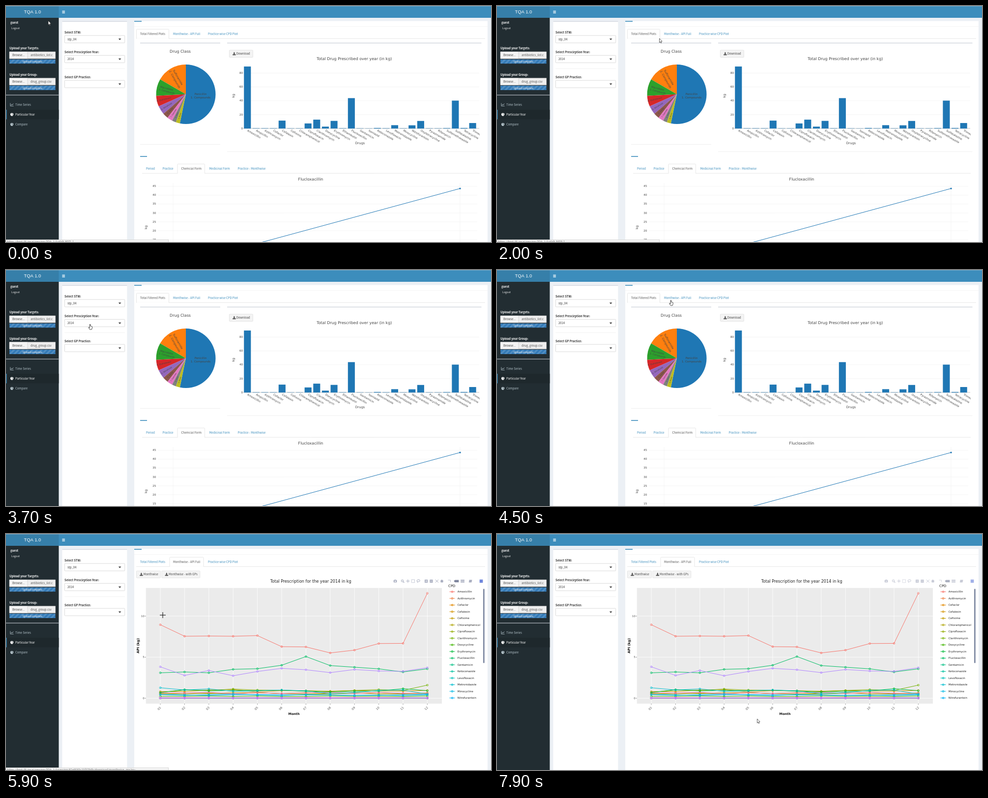
An HTML page with a canvas for the animation above (8000 ms loop, 987x480 px).

```html
<!DOCTYPE html>
<html lang="en">
<head>
<meta charset="utf-8">
<title>Prescription dashboard</title>
<style>
html, body { margin: 0; width: 100%; height: 100%; overflow: hidden; background: #ecf0f5; }
canvas { display: block; width: 987px; height: 480px; }
</style>
</head>
<body>
<canvas id="stage" width="987" height="480"></canvas>
<script>
const ctx = document.getElementById('stage').getContext('2d');
const LOOP = 8000, STEP = 100, SWITCH = 4800;
const UI = '"Noto Sans CJK JP", "Noto Sans CJK SC", "Open Sans", sans-serif';
const PLOT = '"DejaVu Sans", sans-serif';
const LINK = '#3c8dbc', BLUE = '#1f77b4', INK = '#444';

// ---------- helpers ----------
function rect(x, y, w, h, fill) { ctx.fillStyle = fill; ctx.fillRect(x, y, w, h); }

function frame(x, y, w, h, fill, stroke, r = 0) {
  ctx.beginPath();
  ctx.roundRect(x, y, w, h, r);
  if (fill) { ctx.fillStyle = fill; ctx.fill(); }
  if (stroke) { ctx.strokeStyle = stroke; ctx.lineWidth = 0.7; ctx.stroke(); }
}

function line(points, color, width = 1) {
  ctx.beginPath();
  points.forEach(([x, y], i) => i ? ctx.lineTo(x, y) : ctx.moveTo(x, y));
  ctx.strokeStyle = color;
  ctx.lineWidth = width;
  ctx.stroke();
}

function poly(points, fill, stroke, width = 0.8) {
  ctx.beginPath();
  points.forEach(([x, y], i) => i ? ctx.lineTo(x, y) : ctx.moveTo(x, y));
  ctx.closePath();
  if (fill) { ctx.fillStyle = fill; ctx.fill(); }
  if (stroke) { ctx.strokeStyle = stroke; ctx.lineWidth = width; ctx.stroke(); }
}

function disc(x, y, r, fill, stroke) {
  ctx.beginPath();
  ctx.arc(x, y, r, 0, Math.PI * 2);
  if (fill) { ctx.fillStyle = fill; ctx.fill(); }
  if (stroke) { ctx.strokeStyle = stroke; ctx.lineWidth = 0.95; ctx.stroke(); }
}

function text(str, x, y, { size = 5.88, color = INK, font = UI, weight = 400, align = 'left', base = 'alphabetic', turn = 0 } = {}) {
  ctx.save();
  ctx.translate(x, y);
  ctx.rotate(turn * Math.PI / 180);
  ctx.font = `${weight} ${size}px ${font}`;
  ctx.fillStyle = color;
  ctx.textAlign = align;
  ctx.textBaseline = base;
  ctx.fillText(str, 0, 0);
  ctx.restore();
}

const plotText = (str, x, y, opt) => text(str, x, y, { font: PLOT, size: 5.6, ...opt });

function clipped(x, y, w, h, draw) {
  ctx.save();
  ctx.beginPath();
  ctx.rect(x, y, w, h);
  ctx.clip();
  draw();
  ctx.restore();
}

function downloadIcon(x, y) {
  rect(x - 0.8, y - 3.2, 1.6, 2.6, INK);
  poly([[x - 2.2, y - 0.8], [x + 2.2, y - 0.8], [x, y + 1.5]], INK);
  rect(x - 3.2, y + 1.2, 6.4, 1.8, INK);
}

function button(x, y, w, h, label) {
  frame(x, y, w, h, '#f4f4f4', '#ddd', 1.2);
  downloadIcon(x + 10, y + h / 2);
  text(label, x + 14.3, y + h / 2 + 2.2);
}

function pieIcon(x, y, color, back) {
  disc(x, y, 3.1, color);
  line([[x + 0.3, y - 3.4], [x + 0.3, y], [x + 3, y + 2.2]], back, 0.7);
}

function tabs(items, active, y, x0, x1) {
  line([[x0, y], [x1, y]], '#ddd', 0.7);
  items.forEach(([label, x, left, right], i) => {
    if (i === active) {
      frame(left, y - 19, right - left, 19, '#fff', '#ddd', [1.5, 1.5, 0, 0]);
      rect(left + 0.4, y - 0.7, right - left - 0.8, 1.6, '#fff');
    }
    text(label, x, y - 7.2, { color: i === active ? '#555' : LINK });
  });
}

// Evenly spaced hues at chroma 100, luminance 65
function hue(i, n = 27) {
  const a = (15 + 360 * i / n) * Math.PI / 180, Y = 0.3405;
  const u = 100 * Math.cos(a) / 845 + 0.1978, v = 100 * Math.sin(a) / 845 + 0.4683;
  const X = 9 * Y * u / (4 * v), Z = Y * (12 - 3 * u - 20 * v) / (4 * v);
  const rgb = [
    3.2406 * X - 1.5372 * Y - 0.4986 * Z,
    -0.9689 * X + 1.8758 * Y + 0.0415 * Z,
    0.0557 * X - 0.204 * Y + 1.057 * Z
  ].map(c => {
    const g = c <= 0.0031 ? 12.92 * c : 1.055 * Math.pow(c, 1 / 2.4) - 0.055;
    return Math.round(255 * Math.min(1, Math.max(0, g)));
  });
  return `rgb(${rgb})`;
}

// ---------- data ----------
const DRUGS = ('Amoxicillin Ampicillin Azithromycin Cefaclor Cefalexin Cefixime Chloramphenicol Ciprofloxacin ' +
  'Clarithromycin Doxycycline Erythromycin Ethambutol Flucloxacillin Gentamicin Isoniazid Ketoconazole ' +
  'Levofloxacin Metronidazole Minocycline Nitrofurantoin Oxytetracycline Pyrazinamide Rifampicin ' +
  'Sulfamethoxazole Sulfasalazine Tetracycline Trimethoprim').split(' ');
const KG = [89.5, .3, .3, .3, 11.3, .2, .2, 7.2, 12.7, 2.6, 10.9, .3, 43.8, .2, .1, .7, .3, 4.7, .2, 4.5, 10.8, .2, .2, .5, 40.2, .7, 7.8];
const LEGEND = DRUGS.filter(d => !/Ampi|Etham|Isoni/.test(d)).slice(0, 17);

function wobble(seed, mean) {
  let s = seed * 7919 + 17;
  return Array.from({ length: 12 }, () => {
    s = (s * 16807) % 2147483647;
    return Math.max(0, mean * (0.82 + 0.36 * s / 2147483647));
  });
}

const SERIES = [
  [3, wobble(3, 0.92)], [4, wobble(4, 0.58)], [1, wobble(1, 0.02)], [5, wobble(5, 0.01)],
  [6, wobble(6, 0.6)], [8, wobble(8, 0.24)], [11, wobble(11, 0.02)], [12, wobble(12, 0.05)],
  [13, wobble(13, 0.02)], [16, wobble(16, 0.4)], [24, wobble(24, 0.06)], [25, wobble(25, 0.65)],
  [7, [.7, 1, .95, 1.12, 1, .95, .92, .82, .95, 1.06, .95, 1.6]],
  [9, [.7, 1.05, .9, .95, .92, 1, .85, .75, .85, .88, 1.17, .92]],
  [14, [1.28, 1, 1.14, .85, .9, 1, .9, .55, .7, .95, 1, .5]],
  [15, [.45, .35, .45, .52, .4, .32, .45, .4, .35, .4, .32, .42]],
  [22, wobble(22, 0.03)], [20, wobble(20, 0.01)],
  [10, [3.1, 3.2, 3.1, 3.52, 3.6, 4.02, 5.08, 3.98, 3.78, 3.58, 3.2, 3.58]],
  [19.6, [3.83, 2.78, 3.38, 2.74, 3.26, 3.64, 3.47, 3.12, 3.5, 3.32, 3.28, 3.72]],
  [0, [8.95, 7.55, 7.58, 7.55, 7.63, 6.28, 6.25, 5.52, 5.86, 6.66, 6.68, 12.78]]
];

// ---------- page shell ----------
function upload(y, title, file) {
  const white = { color: '#fff', weight: 700 };
  text(title, 7, y, white);
  frame(7, y + 4.7, 93.5, 14, '#eee', '#ccc');
  rect(7, y + 4.7, 37, 14, '#f4f4f4');
  line([[44, y + 4.7], [44, y + 18.7]], '#ccc', 0.7);
  text('Browse...', 13, y + 14);
  clipped(45, y + 4, 50, 15, () => text(file, 50, y + 14, { color: '#555' }));
  clipped(7, y + 20, 93.5, 9, () => {
    rect(7, y + 20, 94, 9, '#337ab7');
    for (let x = -4; x < 110; x += 9.35) {
      poly([[x, y + 29], [x + 4.7, y + 29], [x + 13.7, y + 20], [x + 9, y + 20]], 'rgba(255,255,255,.15)');
    }
    text('Upload complete', 53.8, y + 26.6, { color: '#fff', size: 5.04, align: 'center' });
  });
}

function select(y, label, value) {
  text(label, 119, y, { color: '#333', weight: 700 });
  frame(119.3, y + 4.4, 122.4, 15, '#fff', '#ccc', 1);
  text(value, 125, y + 14.2, { color: '#333' });
  poly([[228.8, y + 10.7], [234.4, y + 10.7], [231.6, y + 13.7]], '#333');
}

function shell() {
  rect(0, 0, 987, 480, '#ecf0f5');
  rect(0, 0, 987, 24, LINK);
  rect(0, 0, 107.4, 24, '#367fa9');
  rect(0, 0, 987, 0.6, '#a5c4d6');
  text('TQA 1.0', 53.8, 15.3, { font: '"Liberation Sans", Arial, sans-serif', size: 9.3, color: '#fff', align: 'center' });
  for (let i = 0; i < 3; i++) rect(114.3, 9.6 + i * 2.1, 5.6, 1.1, '#fff');

  rect(0, 24, 107.4, 456, '#222d32');
  text('guest', 9, 36.3, { color: '#fff', weight: 700 });
  text('Logout', 11, 46.8, { color: '#fff', size: 5.1 });
  upload(88.4, 'Upload your Targets:', 'antibiotics_list.csv');
  upload(142, 'Upload your Group:', 'drug_group.csv');
  rect(0, 180.6, 107.4, 1, '#d2d6de');
  rect(0, 211, 107.4, 19.5, '#1e282c');
  rect(0, 211, 1.4, 19.5, LINK);
  line([[8.8, 197.5], [8.8, 203.5], [15.5, 203.5]], '#b8c7ce', 0.8);
  line([[10, 202], [11.6, 200], [12.8, 201.2], [15, 198.6]], '#b8c7ce', 1);
  pieIcon(12, 220.6, '#fff', '#1e282c');
  pieIcon(12, 240.8, '#b8c7ce', '#222d32');
  text('Time Series', 19, 203.2, { color: '#b8c7ce' });
  text('Particular Year', 19, 223, { color: '#fff' });
  text('Compare', 19, 243.2, { color: '#b8c7ce' });

  rect(114.4, 30.6, 132, 449.4, '#fff');
  rect(114.4, 30.6, 132, 1.5, '#d2d6de');
  select(55.6, 'Select STW:', 'stp_04');
  select(96, 'Select Prescirption Year:', '2014');
  line([[119, 127.3], [242, 127.3]], '#eee', 0.7);
  select(146.8, 'Select GP Practice:', '');

  rect(261, 30.6, 719, 449.4, '#fff');
  rect(261, 30.4, 15, 1.6, LINK);
  line([[261, 41.6], [980, 41.6]], '#f0f0f0', 0.7);
}

function mainTabs(active) {
  tabs([
    ['Total Filtered Plots', 273, 265.4, 331.5],
    ['Monthwise - API Full', 340, 333, 402],
    ['Practice wise CPD Plot', 411, 404, 479]
  ], active, 66.2, 265, 975);
}

function box(x, y, w, h) {
  rect(x, y, w, 1.5, '#d2d6de');
  line([[x, y + h], [x + w, y + h]], '#e8e8e8', 0.7);
}

// ---------- overview page ----------
function pie() {
  const cx = 366, cy = 179.5, r = 60.5;
  const ends = [60, 93, 114, 131, 142, 152.6, 160.5, 168.5, 360];
  const fills = ['#ff7f0e', '#2ca02c', '#d62728', '#9467bd', '#8c564b', '#e377c2', '#7f7f7f', '#bcbd22', BLUE];
  const rad = deg => (-90 - deg) * Math.PI / 180;
  ends.forEach((end, i) => {
    ctx.beginPath();
    ctx.moveTo(cx, cy);
    ctx.arc(cx, cy, r, rad(i ? ends[i - 1] : 0), rad(end), true);
    ctx.fillStyle = fills[i];
    ctx.fill();
  });
  const mid = { align: 'center', base: 'middle' };
  plotText('Penicillin', 396, 179.7, mid);
  plotText('1. Compounds', 396, 187, mid);
  plotText('Sulfonamide', 349.5, 145.5, { ...mid, turn: 60 });
  plotText('2. Compounds', 343, 149.5, { ...mid, turn: 60 });
  plotText('Macrolides', 327, 168, { ...mid, size: 5, turn: 14 });
  plotText('3. Compounds', 327, 174, { ...mid, size: 4.6, turn: 14 });
  ['4. Quinolones', '5. Nitrofuran', '6. Azoles', '7. Cephalos', '8. Other', '9. Mixed'].forEach((label, i) => {
    const a = (ends[i + 1] + ends[i + 2]) / 2, d = rad(a);
    plotText(label, cx + 46 * Math.cos(d), cy + 46 * Math.sin(d), { ...mid, size: [4.4, 4, 3.6, 3.4, 3, 3][i], turn: 90 - a });
  });
}

function bars() {
  const x0 = 491.3, gap = 17.63, base = 249, unit = 1.407;
  for (let v = 0; v <= 80; v += 20) {
    const y = base - v * unit;
    line([[483, y], [963, y]], v ? '#eee' : '#999', 0.6);
    plotText(v, 482, y + 0.2, { align: 'right', base: 'middle' });
  }
  KG.forEach((v, i) => rect(x0 + i * gap - 7.05, base - v * unit, 14.1, v * unit + 0.2, BLUE));
  clipped(450, 249, 514, 46, () => DRUGS.forEach((d, i) =>
    plotText(d, x0 + i * gap, 253.3, { turn: 30, base: 'middle' })));
  plotText('Drugs', 720.5, 281, { size: 6.54, align: 'center' });
  plotText('kg', 463, 182.5, { size: 6.54, align: 'center', base: 'middle', turn: -90 });
}

function overview() {
  mainTabs(0);
  box(273, 74.6, 163, 206.8);
  box(450, 74.6, 517.5, 221.6);
  plotText('Drug Class', 354.5, 95.2, { size: 7.95, align: 'center' });
  pie();
  button(454.4, 89.8, 48, 14.6, 'Download');
  plotText('Total Drug Prescribed over year (in kg)', 708.7, 110.3, { size: 7.95, align: 'center' });
  bars();

  rect(273, 305.2, 14, 1.6, LINK);
  tabs([
    ['Period', 285], ['Practice', 318.5], ['Chemcial Form', 356.5, 349, 404.5],
    ['Medicinal Form', 413.5], ['Practice - Monthwise', 471.5]
  ], 2, 340.3, 277, 964);
  plotText('Flucloxacillin', 620, 354.8, { size: 7.95, align: 'center' });
  for (let i = 0; i < 7; i++) {
    const y = 366.6 + i * 18.1;
    line([[309, y], [959, y]], '#eee', 0.6);
    plotText(45 - i * 5, 305.3, y + 0.2, { align: 'right', base: 'middle' });
  }
  [340, 924].forEach(x => line([[x, 360], [x, 480]], '#eee', 0.6));
  line([[340, 529.5], [924, 371.2]], BLUE, 1);
  disc(924, 371.2, 1.6, BLUE);
  plotText('kg', 285.5, 450, { size: 6.54, align: 'center', base: 'middle', turn: -90 });
}

// ---------- monthly page ----------
const monthX = i => 314 + i * 49.4;
const valueY = v => 334.1 - v * 16.71;

function monthly() {
  mainTabs(1);
  button(265.4, 75, 49, 14.3, 'Monthwise');
  button(316.8, 75, 78, 14.3, 'Monthwise - with GPs');
  plotText('Total Prescription for the year 2014 in kg', 620.2, 99.2, { size: 8.1, color: '#222', align: 'center' });
  rect(284.7, 109.8, 602.3, 235.2, '#ebebeb');
  for (let v = 0; v <= 10; v += 5) {
    const y = valueY(v);
    line([[284.7, y], [887, y]], '#fff', 0.8);
    line([[282.6, y], [284.7, y]], '#333', 0.6);
    plotText(v, 281.6, y + 0.2, { size: 5.46, color: '#4d4d4d', align: 'right', base: 'middle' });
  }
  for (let i = 0; i < 12; i++) {
    const x = monthX(i);
    line([[x, 109.8], [x, 345]], '#fff', 0.8);
    line([[x, 345], [x, 347]], '#333', 0.6);
    plotText(String(i + 1).padStart(2, '0'), x - 1.8, 355, { size: 5.8, color: '#4d4d4d', align: 'center', base: 'middle', turn: -45 });
  }
  SERIES.forEach(([k, values]) => {
    const color = hue(k), points = values.map((v, i) => [monthX(i), valueY(v)]);
    line(points, color, 1);
    points.forEach(([x, y]) => disc(x, y, 1.8, null, color));
  });
  const bold = { weight: 700, color: '#111', align: 'center' };
  plotText('Month', 586, 368, { ...bold, size: 6.4 });
  plotText('API (kg)', 269, 227.3, { ...bold, size: 6.8, base: 'middle', turn: -90 });

  plotText('CPD', 900, 107.6, { size: 7, color: '#222' });
  LEGEND.forEach((name, i) => {
    const y = 117.5 + i * 13.5;
    line([[902.5, y], [913.5, y]], hue(i), 1);
    disc(908, y, 1.8, null, hue(i));
    plotText(name, 918.8, y + 0.2, { size: 5.46, color: '#222', base: 'middle' });
  });
  frame(971, 111.5, 2.8, 151, '#808ba4', null, 1.2);
}

function modebar(alpha) {
  const c = '#a9aec0', y = 95.8;
  ctx.save();
  ctx.globalAlpha = alpha;
  frame(788.8, y - 2.2, 6.6, 5, c, null, 0.8);
  rect(790.8, y - 3, 2.6, 1, c);
  disc(792.1, y + 0.3, 1.3, '#fff');
  disc(806.6, y - 0.6, 2.3, null, c);
  line([[808.2, y + 1], [810.4, y + 3.2]], c, 1.3);
  line([[805.4, y - 0.6], [807.8, y - 0.6]], c, 0.7);
  line([[814.3, y], [821.5, y]], c);
  line([[817.9, y - 3.6], [817.9, y + 3.6]], c);
  ctx.setLineDash([1.4, 0.8]);
  ctx.strokeStyle = c;
  ctx.strokeRect(825.3, y - 3, 6.2, 6);
  ctx.setLineDash([]);
  ctx.beginPath();
  ctx.ellipse(839.2, y - 0.8, 3.2, 2.2, -0.2, 0, Math.PI * 2);
  ctx.stroke();
  line([[837, y + 1], [837.6, y + 3]], c);
  [855, 865.4].forEach((x, i) => {
    rect(x - 3, y - 3, 6.2, 6.2, c);
    rect(x - 1.8, y - 0.3, 3.8, 0.8, '#fff');
    if (!i) rect(x - 0.3, y - 1.8, 0.8, 3.8, '#fff');
  });
  line([[873.8, y - 3], [880, y + 3]], c);
  line([[880, y - 3], [873.8, y + 3]], c);
  poly([[887, y - 3.3], [890.6, y], [889.5, y], [889.5, y + 2.8], [884.5, y + 2.8], [884.5, y], [883.4, y]], c);
  line([[899.5, y - 2], [904.5, y - 2], [904.5, y + 2]], c, 0.8);
  poly([[911.4, y], [913.6, y - 2.4], [921.4, y - 2.4], [921.4, y + 2.4], [913.6, y + 2.4]], '#7d849c');
  rect(925.2, y - 2.8, 7.8, 2.3, c);
  rect(925.2, y + 0.5, 7.8, 2.3, c);
  poly([[942.8, y - 2.6], [948.6, y - 2.6], [947.4, y + 2.6], [941.8, y + 2.6]], c);
  rect(963.8, y - 3.2, 6.6, 6.6, '#6f86dc');
  ctx.restore();
}

// ---------- pointer and status ----------
const PATH = [
  [0, 86, 30], [200, 86, 30], [1100, 296, 54], [1700, 330.5, 66], [2100, 330.5, 66], [3200, 170.5, 110],
  [3800, 170.5, 110], [4600, 361.5, 59], [5000, 361.5, 59], [5300, 345, 82], [5800, 319, 165],
  [6100, 319, 165], [7100, 329.5, 375], [7200, 329.5, 375], [7900, 529.5, 376]
];

function pointerAt(t) {
  const i = Math.max(1, PATH.findIndex(p => p[0] >= t));
  const [t0, x0, y0] = PATH[i - 1], [t1, x1, y1] = PATH[i];
  const p = (t - t0) / (t1 - t0), e = p * p * (3 - 2 * p);
  return [x0 + (x1 - x0) * e, y0 + (y1 - y0) * e];
}

function pointer(x, y, page) {
  const inside = (l, t, r, b) => x > l && x < r && y > t && y < b;
  const at = pts => pts.map(([a, b]) => [x + a, y + b]);
  if (page && inside(285, 110, 887, 345)) {
    line([[x - 6, y], [x + 6, y]], '#111', 1.1);
    line([[x, y - 6], [x, y + 6]], '#111', 1.1);
  } else if (inside(265, 47, 479, 65.5) || inside(119, 60, 242, 75) || inside(119, 100, 242, 116) ||
    (page && inside(265, 75, 395, 89))) {
    poly(at([[0, 0.5], [1.3, 0.5], [1.4, 4], [4.6, 4.8], [5, 6], [4.6, 9], [3.8, 11], [0, 11],
      [-2.4, 7.4], [-2.2, 6.2], [-0.2, 7.6]]), '#fff', '#222', 0.8);
  } else {
    poly(at([[0, 0], [0, 8.4], [1.9, 6.7], [3.1, 9.4], [4.3, 8.9], [3.1, 6.2], [5.7, 6]]), '#fff', '#222', 0.7);
  }
}

function status(t) {
  if (!(t < 3000 || (t >= SWITCH && t < 6500))) return;
  const root = 'https://host-05.local/session/TQA_1.0/';
  const tail = t < 1500 ? '#tab-8071-1' : t < 3000 ? '#tab-8459-1' : t < 5300 ? '#tab-8459-2'
    : 'session/82e9583c15f3794b/download/monthwise_gps?w=';
  clipped(0, 475, 331, 5, () => {
    rect(0, 475, 331, 5, '#f5f5f5');
    rect(0, 475, 331, 0.6, '#c4c4c4');
    rect(330.4, 475, 0.6, 5, '#c4c4c4');
    text(root + tail, 2, 482.2, { size: 5.8, color: '#777' });
  });
}

function render(t) {
  const page = t >= SWITCH, [x, y] = pointerAt(t);
  shell();
  page ? monthly() : overview();
  if (page && t >= 5400) modebar(t < 6600 ? 1 : 0.65);
  status(t);
  pointer(x, y, page);
}

let last = -1;
function tick() {
  const t = Math.floor(performance.now() % LOOP / STEP) * STEP;
  if (t !== last) render(last = t);
  requestAnimationFrame(tick);
}
tick();
</script>
</body>
</html>
```
